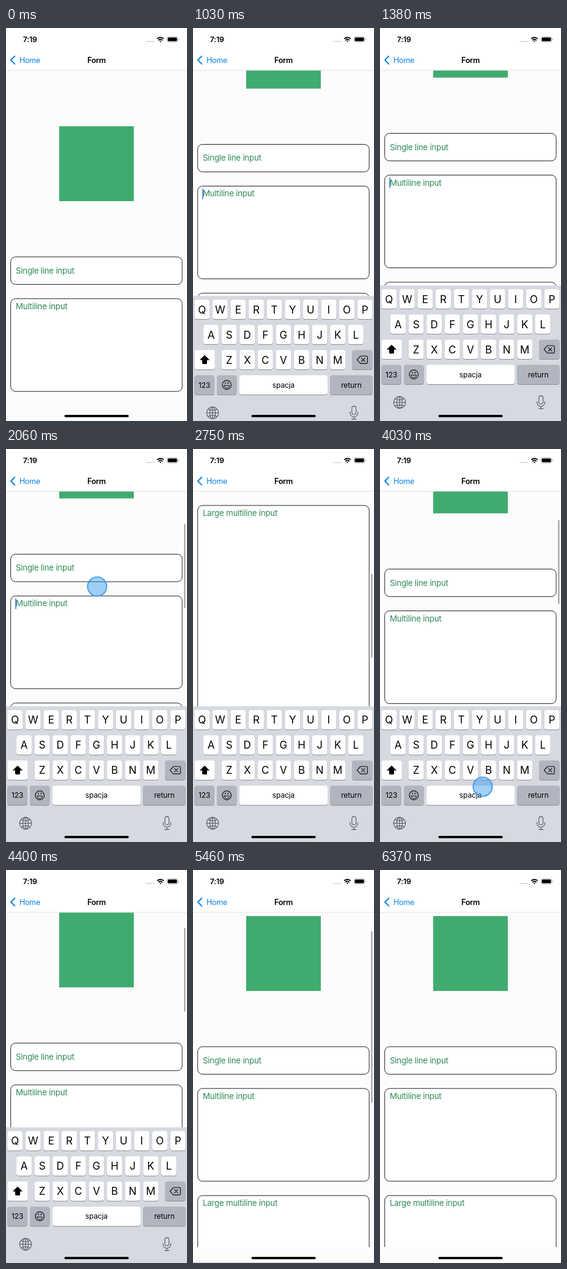
An HTML page for the animation above (6.41 s loop, 296x640 px).

```html
<!DOCTYPE html>
<html lang="en">
<head>
<meta charset="utf-8">
<title>Form</title>
<style>
  html, body { margin: 0; width: 100%; height: 100%; overflow: hidden; background: #fff; }
  svg { display: block; width: 296px; height: 640px; }
  text { font-family: Inter, "Liberation Sans", sans-serif; fill: #000; }
  .label { font-size: 13.3px; letter-spacing: -.24px; fill: #2e8b57; }
  .nav { font-size: 12.6px; letter-spacing: -.3px; }
  .bold { font-weight: 600; }
  .mid { text-anchor: middle; }
  .letter { font-size: 17px; }
  .word { font-size: 12px; letter-spacing: -.1px; }
  .line { fill: none; stroke-linecap: round; stroke-linejoin: round; }
</style>
</head>
<body>
<svg viewBox="0 0 296 640" xmlns="http://www.w3.org/2000/svg">
  <defs><clipPath id="view"><rect y="69" width="296" height="545"/></clipPath></defs>
  <rect width="296" height="640" fill="#fcfcfc"/>

  <g clip-path="url(#view)">
    <g id="content">
      <rect x="87" y="160" width="122" height="122" fill="#40ab70"/>
      <g id="fields"></g>
      <rect id="caret" x="15.2" y="444.8" width="1.7" height="17.5" rx=".8" fill="#3f7be6"/>
    </g>
  </g>
  <rect id="bar" x="291.2" width="2.3" rx="1.15" fill="#000" fill-opacity=".35"/>

  <rect width="296" height="69" fill="#fff"/>
  <rect y="68.5" width="296" height=".8" fill="#dcdcdc"/>
  <text x="27.8" y="23" class="bold" font-size="12.4" letter-spacing="-.2">7:19</text>
  <path class="line" d="M230.6 22H242" stroke="#bdbdbd" stroke-width="2.2" stroke-dasharray="0 3.5"/>
  <g class="line" stroke="#000" stroke-width="1.9" style="stroke-linecap:butt">
    <path d="M247.3 17.6a7.8 7.8 0 0 1 10.6 0M249.4 20a4.8 4.8 0 0 1 6.4 0"/>
    <path d="M252.6 23.2l-1.5 -1.6a2.2 2.2 0 0 1 3 0z" fill="#000" stroke="none"/>
  </g>
  <rect x="263.4" y="14.4" width="17.4" height="8.4" rx="2.6" fill="none" stroke="#9b9b9b" stroke-width=".8"/>
  <rect x="264.6" y="15.6" width="15" height="6" rx="1.5"/>
  <path d="M281.8 17.2a1.5 1.5 0 0 1 0 2.9z" fill="#9b9b9b"/>
  <path class="line" d="M14.3 46L8 52.3L14.3 58.6" stroke="#0a84e8" stroke-width="2"/>
  <text x="22" y="57" class="nav" style="fill:#0a84e8">Home</text>
  <text x="148" y="57" class="nav bold mid">Form</text>

  <g id="keyboard">
    <rect y="419" width="296" height="222" fill="#d6d9e0"/>
    <g id="keys"></g>
    <path d="M19 515.4L27.2 523.6H23V528.6Q23 530 21.6 530H16.4Q15 530 15 528.6V523.6H10.8Z"/>
    <g class="line" stroke="#111" stroke-width="1.2">
      <path d="M274 517H283.5Q285.3 517 285.3 518.8V527.4Q285.3 529.2 283.5 529.2H274L268.2 523.1Z"/>
      <path d="M275.6 520.4L281 525.8M281 520.4L275.6 525.8"/>
      <circle cx="55.2" cy="564" r="7.3"/>
      <path d="M50.9 565H59.5A4.3 4.3 0 0 1 50.9 565Z" stroke-width="1"/>
      <path d="M53 560.4v1.2M57.4 560.4v1.2" stroke-width="1.6"/>
    </g>
    <g class="line" stroke="#555960" stroke-width="1.1">
      <circle cx="32" cy="609.5" r="9.7"/><ellipse cx="32" cy="609.5" rx="4.6" ry="9.7"/>
      <path d="M32 600V619M22.3 609.5H41.7M24.6 603.6Q32 607.4 39.4 603.6M24.6 615.4Q32 611.6 39.4 615.4"/>
      <rect x="259.8" y="598.6" width="6.8" height="13.4" rx="3.4"/>
      <path d="M256.8 608V609.6A6.4 6.4 0 0 0 269.6 609.6V608M263.2 616V619.6M259.6 619.6H266.8"/>
    </g>
  </g>

  <circle id="touch" fill="#2f97f0" fill-opacity=".45" stroke="#3f9de8" stroke-width="1.9"/>
  <rect x="95.5" y="630" width="105.2" height="3.8" rx="1.9"/>
</svg>

<script>
const $ = id => document.getElementById(id);

function set(el, attrs) {
  for (const name in attrs) el.setAttribute(name, attrs[name]);
}

function add(parent, tag, attrs, text = '') {
  const el = document.createElementNS('http://www.w3.org/2000/svg', tag);
  set(el, attrs);
  el.textContent = text;
  parent.append(el);
}

function field(y, height, label, baseline) {
  add($('fields'), 'rect', { x: 7.7, y, width: 280.4, height, rx: 7.8, fill: '#fff', stroke: '#222' });
  add($('fields'), 'text', { x: 16, y: y + baseline, class: 'label' }, label);
}
field(372.8, 44.8, 'Single line input', 27);
field(440.8, 151, 'Multiline input', 17);
field(615.2, 486, 'Large multiline input', 17);

const GREY = '#b0b5bf';
const EDGE = 2.3, PITCH = 29.6, ROW = 41, TOP = 425.3;

function key(row, x, width, label, type = 'word', fill = '#fff') {
  const y = TOP + ROW * row;
  const box = { x, width, height: 31.5, rx: 3.8 };
  add($('keys'), 'rect', { ...box, y: y + 1, fill: '#8c8f96' });
  add($('keys'), 'rect', { ...box, y, fill });
  const base = y + (type === 'letter' ? 22 : 20);
  add($('keys'), 'text', { x: x + width / 2, y: base, class: 'mid ' + type }, label);
}
['QWERTYUIOP', 'ASDFGHJKL', 'ZXCVBNM'].forEach((letters, row) => {
  const left = EDGE + PITCH * (10 - letters.length) / 2;
  [...letters].forEach((c, i) => key(row, left + PITCH * i, 24.8, c, 'letter'));
});
key(2, EDGE, 33.5);
key(2, 260, 33.5, '', 'word', GREY);
key(3, EDGE, 32.5, '123', 'word', GREY);
key(3, 39, 32.5, '', 'word', GREY);
key(3, 76, 144, 'spacja');
key(3, 224.2, 69.4, 'return', 'word', GREY);

// Motion, all times in ms
const LOOP = 6410, STEP = 115;
const SHOW = 800, HIDE = 5230;
const PRESS = 120, RELEASE = 420, GLIDE = 125;
const FOCUS_SCROLL = 201.5;

const taps = [
  { at: 650, end: SHOW, x: 128, y: 477 },
  { at: 5000, end: HIDE, x: 168.5, y: 236 }
];
const flicks = [
  { at: 1940, x: 149, from: 224, to: 43, rest: 530 },
  { at: 3090, x: 168, from: 400, to: 550, rest: 362 },
  { at: 3530, x: 168, from: 400, to: 550, rest: 85 }
];
flicks.forEach((f, i) => f.scroll = i ? flicks[i - 1].rest : FOCUS_SCROLL);

const phases = [0, SHOW, HIDE, ...[...taps, ...flicks].map(g => g.at)].sort((a, b) => a - b);

const ramp = (t, a, b) => Math.min(1, Math.max(0, (t - a) / (b - a)));

// Critically damped spring from 0 to 1
function spring(ms, rate) {
  const k = Math.max(0, ms) / 1000 * rate;
  return 1 - (1 + k) * Math.exp(-k);
}
const rise = (t, start) => t < SHOW ? 0 : spring(t - start, 14.4);
const fall = t => t < HIDE ? 0 : spring(t - HIDE + 70, 22);

// The finger speeds up until it lets go
const travel = (f, t) => (f.to - f.from) * ramp(t - f.at, PRESS, RELEASE) ** 2;

function scrollAt(t) {
  const f = flicks.findLast(f => t >= f.at);
  if (!f) return FOCUS_SCROLL * rise(t, SHOW - 49);
  const dragged = f.scroll - travel(f, t);
  const glide = Math.max(0, t - f.at - RELEASE);
  return f.rest + (dragged - f.rest) * Math.exp(-glide / GLIDE);
}

function touchAt(t) {
  const tap = taps.find(g => t >= g.at && t < g.end);
  if (tap) return { ...tap, alpha: 1 };
  const f = flicks.findLast(f => t >= f.at);
  const ms = f ? t - f.at : Infinity;
  if (ms > RELEASE + 240) return { x: 0, y: 0, alpha: 0 };
  const alpha = .45 + .55 * Math.min(ramp(ms, 0, PRESS - 10), 1 - ramp(ms, RELEASE + 60, RELEASE + 160));
  return { x: f.x, y: f.from + travel(f, t), alpha };
}

function caretAt(t) {
  if (t < SHOW || t > 3600) return 0;
  return 1 - ramp((t - 960) % 970, 580, 700);
}

function draw(t) {
  const scroll = scrollAt(t), gone = fall(t), touch = touchAt(t);
  set($('content'), { transform: `translate(0 ${-scroll})` });
  set($('keyboard'), { transform: `translate(0 ${222 * (1 - rise(t, SHOW - 62) + gone)})` });
  set($('caret'), { opacity: caretAt(t) });
  set($('bar'), {
    y: 71 + .2525 * scroll + 22.5 * ramp(t, 5300, 5800),
    height: 137 + 144 * gone,
    opacity: ramp(t, 1880, 2050) - ramp(t, 5800, 6260)
  });
  set($('touch'), { cx: touch.x, cy: touch.y, r: 14 + 1.6 * touch.alpha, opacity: touch.alpha });
}

// The screen refreshes every STEP, counted anew from each phase
const start = performance.now();
function frame() {
  const t = (performance.now() - start) % LOOP;
  const phase = phases.findLast(p => p <= t);
  draw(phase + Math.floor((t - phase) / STEP) * STEP);
  requestAnimationFrame(frame);
}
frame();
</script>
</body>
</html>
```
